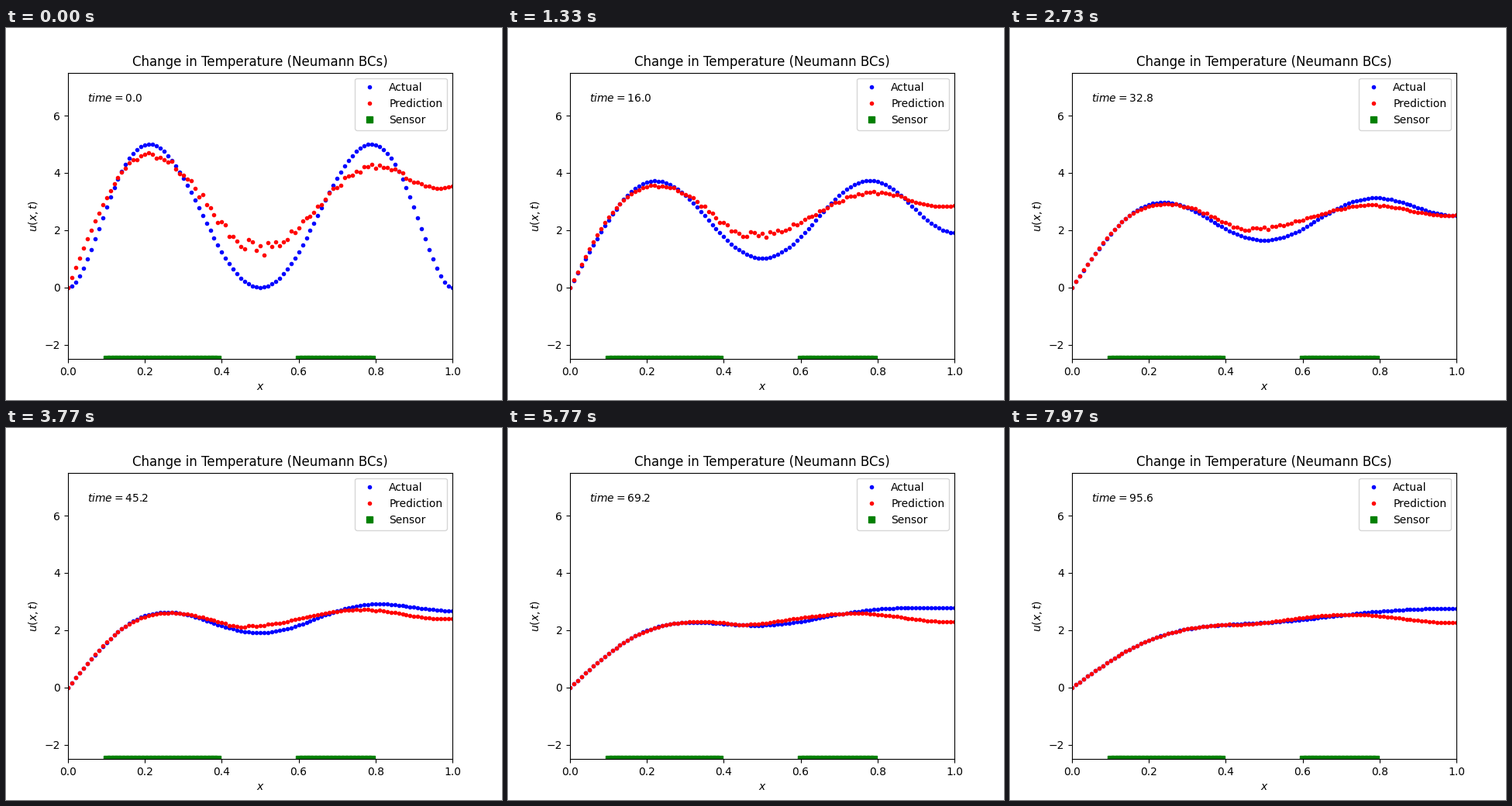
Recreate the animation shown at these times as a matplotlib script. Size 640 by 480 pixels, loop 8 s.

```python
import numpy as np
import matplotlib.pyplot as plt
from matplotlib.animation import FuncAnimation

LOOP_MS = 8000
TICK_MS = 20       # redraw interval
STEPS = 240        # simulated states per loop
DT = 0.4           # simulated time per state
SUBSTEPS = 4
ALPHA = 3e-4       # thermal diffusivity

x = np.linspace(0, 1, 101)
times = DT * np.arange(STEPS)


def heat_history():
    """Heat equation with u = 0 on the left and zero flux on the right."""
    u = 2160 * (x * (x - 0.5) * (1 - x)) ** 2
    r = ALPHA * DT / SUBSTEPS / (x[1] - x[0]) ** 2
    rows = [u]
    for _ in range(STEPS - 1):
        for _ in range(SUBSTEPS):
            padded = np.r_[u, u[-2]]    # mirror node for the flux condition
            u = np.r_[0, u[1:] + r * (padded[2:] - 2 * u[1:] + u[:-1])]
        rows.append(u)
    return np.array(rows)


def wave(*turns):
    """Curve over x with half-cosine swings between turning points."""
    px, py = np.array(turns).T
    phase = np.interp(x, px, np.arange(len(px)))
    k = np.minimum(phase.astype(int), len(px) - 2)
    s = (1 - np.cos(np.pi * (phase - k))) / 2
    return py[k] + (py[k + 1] - py[k]) * s


def prediction_history(actual):
    """Rough first estimate that relaxes towards its settled shape."""
    rng = np.random.default_rng(4)
    spread = np.interp(x, [0.1, 0.2, 0.48, 0.65, 0.85, 0.95],
                       [0.0, 0.05, 0.17, 0.04, 0.09, 0.01])
    noise = spread * rng.uniform(-1.6, 1.6, x.size)
    first = noise + wave((-0.21, -4.62), (0.21, 4.62), (0.5, 1.35),
                         (0.8, 4.25), (0.97, 3.46), (1.05, 3.75))
    settled = wave((0.3, 2.05), (0.72, 2.53), (1, 2.24))
    blend = wave((0.38, 0), (0.5, 1))
    base = actual + blend * (settled - actual)
    rate = 0.046 + 0.15 * np.exp(-x / 0.065)
    return base + (first - base[0]) * np.exp(-rate * times[:, None])


actual = heat_history()
predicted = prediction_history(actual)

fig, ax = plt.subplots(figsize=(6.4, 4.8), dpi=100)
actual_dots, = ax.plot(x, actual[0], 'b.', label='Actual')
predicted_dots, = ax.plot(x, predicted[0], 'r.', label='Prediction')
sensors = np.r_[x[10:40], x[60:80]]
ax.plot(sensors, np.full(sensors.size, -2.5), 'gs', label='Sensor')
clock = ax.text(0.05, 6.5, '')
ax.set(xlim=(0, 1), ylim=(-2.5, 7.5), xlabel='$x$', ylabel='$u(x,t)$',
       title='Change in Temperature (Neumann BCs)')
ax.legend(loc='upper right')


def draw(tick):
    # sample late in each tick so states change on centisecond steps
    i = int((tick * TICK_MS + 15) * STEPS / LOOP_MS)
    actual_dots.set_ydata(actual[i])
    predicted_dots.set_ydata(predicted[i])
    clock.set_text(f'$time = {times[i]:.1f}$')
    return actual_dots, predicted_dots, clock


anim = FuncAnimation(fig, draw, frames=LOOP_MS // TICK_MS, interval=TICK_MS,
                     init_func=lambda: draw(0), repeat=True, repeat_delay=0,
                     blit=False)
plt.show()
```
